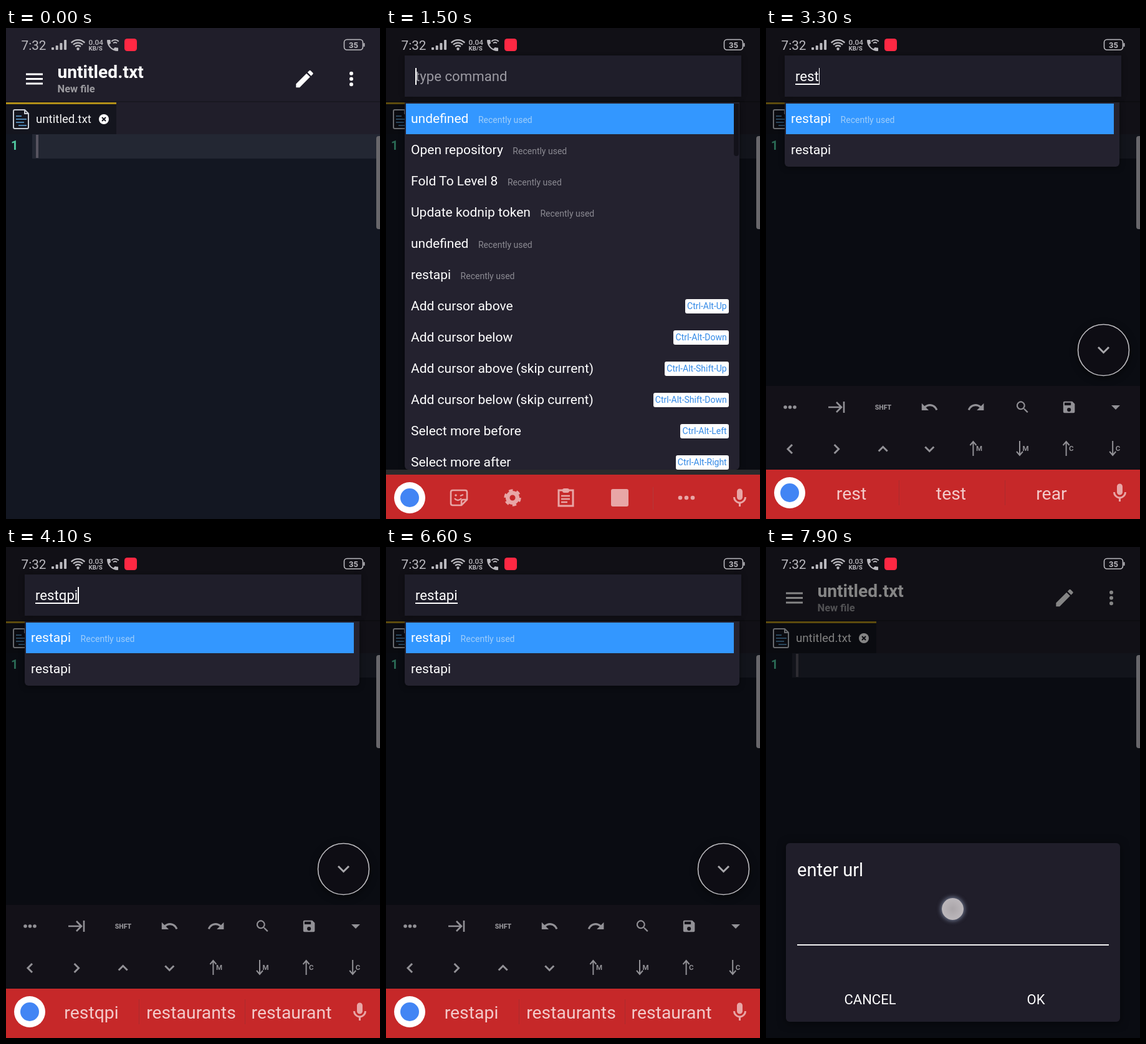
Recreate the animation shown at these times as an HTML page. Size 600 by 786 pixels, loop 8000 ms.

```html
<!DOCTYPE html>
<html lang="en">
<head>
<meta charset="utf-8">
<title>Command palette</title>
<style>
html, body { margin: 0; width: 100%; height: 100%; overflow: hidden; background: #131722; }
#stage { position: relative; width: 600px; height: 786px; overflow: hidden; font-family: Roboto, sans-serif; color: #fff; }
#stage > * { position: absolute; }
svg { left: 0; top: 0; width: 600px; height: 786px; font-family: Roboto, sans-serif; }
#dim { inset: 0; background: rgba(0, 0, 0, .48); }
#palette { inset: 0; }
#palette > * { position: absolute; }
#input { left: 30px; top: 44px; width: 523px; height: 66px; padding-left: 17px; background: #1f1e2a; font-size: 22.2px; line-height: 66px; box-shadow: 0 0 8px rgba(0, 0, 0, .35); }
#hint { color: #9b9aa2; position: absolute; }
#typed { display: inline-block; position: relative; }
#typed::after { content: ""; position: absolute; left: 0; right: 0; top: 45px; height: 1.5px; background: #fff; }
#caret { display: inline-block; position: absolute; top: 20px; width: 1.6px; height: 27px; background: #fff; }
#list { left: 30px; top: 119px; width: 537px; overflow: hidden; background: #24222f; border-radius: 0 0 6px 6px; font-size: 21px; box-shadow: 0 2px 10px rgba(0, 0, 0, .4); }
.row { position: relative; top: 1px; height: 50px; margin: 0 9px 0 2px; padding-left: 8px; line-height: 50px; white-space: pre; }
.row:first-child { background: linear-gradient(transparent 1px, #3397ff 1px); }
.row small { margin-left: 15.5px; font-size: 14px; color: #8b8a92; }
.row:first-child small { color: #9fcdf9; }
kbd { position: absolute; right: 8px; top: 14px; height: 23px; padding: 0 3.3px; border-radius: 3px; background: #fff; color: #3289e6; font: 14px/23px Roboto, sans-serif; }
#thumb { left: 558px; top: 121px; width: 8px; background: #13121a; border-radius: 0 0 4px 4px; }
#dialog { left: 32px; width: 536px; height: 286px; border-radius: 6px; background: #201e2a; box-shadow: 0 2px 14px rgba(0, 0, 0, .5); }
#dialog * { position: absolute; line-height: 40px; white-space: pre; }
#dialog .title { left: 18px; top: 23px; font-size: 29px; }
#dialog .line { left: 18px; top: 162px; width: 500px; height: 2px; background: #f2f2f2; }
#dialog .button { top: 231px; width: 200px; text-align: center; font-size: 22px; }
#dot { left: 282px; top: 562px; width: 35px; height: 35px; border-radius: 50%; background: radial-gradient(#aaa5a9, #c3bfc3); box-shadow: 0 0 6px 2px rgba(150, 165, 195, .6); }
</style>
</head>
<body>
<div id="stage">
  <svg id="editor"></svg>
  <div id="dim"></div>
  <svg id="tools"></svg>
  <div id="palette">
    <div id="input"><span id="hint">type command</span><span id="typed"></span><i id="caret"></i></div>
    <div id="list"></div>
    <div id="thumb"></div>
  </div>
  <div id="dialog">
    <div class="title">enter url</div>
    <div class="line"></div>
    <div class="button" style="left:35px">CANCEL</div>
    <div class="button" style="left:301px">OK</div>
  </div>
  <svg id="keyboard"></svg>
  <svg id="status"></svg>
  <div id="dot"></div>
</div>
<script>
const $ = id => document.getElementById(id);
const DURATION = 8000;

// ---- drawing helpers ----
const rect = (x, y, w, h, fill, r = 0) => `<rect x="${x}" y="${y}" width="${w}" height="${h}" rx="${r}" fill="${fill}"/>`;
const circle = (x, y, r, fill, more = '') => `<circle cx="${x}" cy="${y}" r="${r}" fill="${fill}" ${more}/>`;
const line = (d, color, width = 2, more = '') => `<path d="${d}" fill="none" stroke="${color}" stroke-width="${width}" ${more}/>`;
const label = (s, x, y, size, fill, weight = 400, more = '') =>
  `<text x="${x}" y="${y}" font-size="${size}" font-weight="${weight}" fill="${fill}" ${more}>${s}</text>`;
const icon = (d, x, y, scale, fill) =>
  `<path transform="translate(${x} ${y}) scale(${scale}) translate(-12 -12)" d="${d}" fill="${fill}"/>`;
const dots = (x, y, dx, dy, r, fill) => [-1, 0, 1].map(k => circle(x + k * dx, y + k * dy, r, fill)).join('');

const PENCIL = 'M3 17.25V21h3.75L17.81 9.94l-3.75-3.75zM20.71 7.04a1 1 0 0 0 0-1.41l-2.34-2.34a1 1 0 0 0-1.41 0l-1.83 1.83 3.75 3.75z';
const SEARCH = 'M15.5 14h-.79l-.28-.27A6.5 6.5 0 1 0 9.5 16c1.61 0 3.09-.59 4.23-1.57l.27.28v.79l5 4.99L20.49 19zm-6 0a4.5 4.5 0 1 1 0-9 4.5 4.5 0 0 1 0 9z';
const SAVE = 'M17 3H5a2 2 0 0 0-2 2v14a2 2 0 0 0 2 2h14a2 2 0 0 0 2-2V7zm-5 16a3 3 0 1 1 0-6 3 3 0 0 1 0 6zm3-10H5V5h10z';
const UNDO = 'M12.5 8c-2.65 0-5.05 1-6.9 2.6L2 7v9h9l-3.62-3.62A8 8 0 0 1 12.5 10.5c3.54 0 6.55 2.31 7.6 5.5l2.37-.78C21.08 11.03 17.15 8 12.5 8z';
const MIC = 'M12 14a3 3 0 0 0 3-3V5a3 3 0 0 0-6 0v6a3 3 0 0 0 3 3zm5-3a5 5 0 0 1-10 0H5a7 7 0 0 0 6 6.92V21h2v-3.08A7 7 0 0 0 19 11z';
const PHONE = 'M6.6 10.8a15 15 0 0 0 6.6 6.6l2.2-2.2a1 1 0 0 1 1-.25 11 11 0 0 0 3.6.57 1 1 0 0 1 1 1V20a1 1 0 0 1-1 1A17 17 0 0 1 3 4a1 1 0 0 1 1-1h3.5a1 1 0 0 1 1 1c0 1.25.2 2.45.57 3.57a1 1 0 0 1-.25 1z';

function drawEditor() {
  const white = '#fff', header = '#201e2a';
  $('editor').innerHTML =
    rect(0, 0, 600, 786, '#131722') + rect(0, 0, 600, 170, header) +
    rect(0, 117, 600, 2, '#191821') +
    [72.5, 80, 87.5].map(y => rect(32, y, 27, 3, white)).join('') +
    label('untitled.txt', 82.5, 80, 28.2, white, 700) +
    label('New file', 82.5, 103, 16.5, '#9b9a9f', 700) +
    icon(PENCIL, 479, 81.5, 1.52, white) + dots(554, 81.5, 0, 8.7, 3, white) +
    rect(0, 119, 177, 51, '#14151e') + rect(0, 119, 177, 3, '#b18f18') +
    line('M30 131H14q-2 0-2 2v26q0 2 2 2h20q2 0 2-2v-22zv6h6', '#c9cdd4', 2) +
    line('M16 141h9M16 146h17M16 151h13M20 156h13', '#4f83ad', 2) +
    label('untitled.txt', 48, 152, 18.7, '#f4f4f4') +
    circle(157, 146, 8, white) + line('M154 143l6 6m0-6l-6 6', '#14151e', 2) +
    rect(42, 170, 558, 39, '#232733') + rect(48, 171, 4, 37, '#575460') +
    label('1', 8, 195, 20, '#50c9a0', 700);
}

function drawTools() {
  const grey = '#929196';
  const column = k => 38.5 + k * 74.6;
  const chevron = (k, angle) =>
    `<g transform="translate(${column(k)} 674) rotate(${angle})">${line('M-7 3.5L0-3.5L7 3.5', grey, 3)}</g>`;
  const move = (k, letter, flip) =>
    `<g transform="translate(${column(k) - 4.5} 673) scale(1 ${flip})">${line('M0 12V-11M-5-5L0-11L5-5', grey, 2)}</g>` +
    label(letter, column(k), 677, 11.5, grey, 700);
  $('tools').innerHTML =
    circle(541.5, 515.5, 41, '#0e0d14', 'stroke="#bdbcc0" stroke-width="1.6" style="filter:drop-shadow(0 3px 6px #0008)"') +
    line('M533 511l8.5 8.5L550 511', '#a9a8ac', 3) +
    rect(0, 573, 600, 134, '#131118') +
    dots(column(0), 607, 7.5, 0, 2.8, grey) +
    line('M100 607h20M113 599l8 8l-8 8M125 598v18', grey, 2.6) +
    label('SHFT', 188, 611, 10.5, grey, 900, 'text-anchor="middle"') +
    icon(UNDO, column(3), 607, 1.25, grey) +
    `<g transform="translate(${2 * column(4)} 0) scale(-1 1)">${icon(UNDO, column(4), 607, 1.25, grey)}</g>` +
    icon(SEARCH, column(5), 607, 1.07, grey) + icon(SAVE, column(6), 607, 1.03, grey) +
    `<path d="M554 604h14l-7 7z" fill="${grey}"/>` +
    chevron(0, -90) + chevron(1, 90) + chevron(2, 0) + chevron(3, 180) +
    move(4, 'M', 1) + move(5, 'M', -1) + move(6, 'C', 1) + move(7, 'C', -1);
}

function drawKeyboard() {
  const pink = '#e8a6a6';
  const shortcuts =
    line('M107 732h20q3 0 3 3v12l-9 9h-14q-3 0-3-3v-18q0-3 3-3zM130 747h-6q-3 0-3 3v6', pink, 2.6) +
    circle(112, 740, 1.8, pink) + line('M119 741l5-2M110 745q5 6 11 0', pink, 2.4) +
    circle(203, 744, 7.8, 'none', `stroke="${pink}" stroke-width="6.5"`) +
    circle(203, 744, 11.7, 'none', `stroke="${pink}" stroke-width="4" stroke-dasharray="6.2 6.05"`) +
    line('M277 732h23v25h-23z', pink, 3) + rect(283, 729, 11, 7, pink, 3) +
    line('M281 741h14M281 746h14M281 751h10', pink, 2.4) +
    rect(361, 730, 28, 28, pink, 3) + rect(428, 727, 1, 36, '#b23a3a') +
    dots(482, 744, 10, 0, 3.3, pink);
  const word = x => label('', x, 755, 28.4, '#f3caca', 400, 'class="word" text-anchor="middle"');
  $('keyboard').innerHTML = rect(0, 707, 600, 79, '#2b2a2c') +
    `<g id="keys">${rect(0, 707, 600, 90, '#c62829')}
      ${circle(38, 744, 25, '#fff')}${circle(38, 744, 15, '#4285f4')}
      ${icon(MIC, 567.5, 744.5, 1.5, pink)}
      <g id="shortcuts">${shortcuts}</g>
      <g id="words">${[137, 297, 458].map(word).join('')}
        ${rect(213, 724, 1, 40, '#aa2c2e')}${rect(383, 724, 1, 40, '#aa2c2e')}</g></g>`;
}

function drawStatus() {
  const grey = '#bbbabf';
  const arc = (x, y, r, w) => line(`M${x - r * .72} ${y - r * .69}A${r} ${r} 0 0 1 ${x + r * .72} ${y - r * .69}`, grey, w);
  $('status').innerHTML =
    label('7:32', 24.5, 35, 20.7, grey) +
    [4, 7, 11, 16].map((h, k) => rect(73 + k * 6.7, 35 - h, 4, h, grey, 1)).join('') +
    [15, 10.5, 6].map(r => arc(115.5, 34, r, 2.3)).join('') + circle(115.5, 33.5, 2.2, grey) +
    label('', 132.5, 26.5, 11.8, grey, 500, 'id="speed"') + label('KB/S', 132.5, 36, 9.8, grey, 700) +
    icon(PHONE, 171, 28, 1, grey) + arc(175, 27, 8, 2) + arc(175, 27, 4, 2) +
    rect(190, 17, 20, 20, '#ff2843', 4.5) +
    `<rect x="542.5" y="18.5" width="30" height="16.5" rx="4.5" fill="none" stroke="${grey}" stroke-width="1.6"/>` +
    rect(573.5, 24, 2, 6, grey, 1) +
    label('35', 557.5, 31.5, 13, grey, 700, 'text-anchor="middle"') +
    rect(594, 173, 10, 149, '#68676b', 4);
}

// ---- palette contents ----
const recent = ['undefined', 'Open repository', 'Fold To Level 8', 'Update kodnip token', 'undefined', 'restapi']
  .map(name => [name, 'Recently used']);
const skipping = [
  ['Add cursor above (skip current)', '', 'Ctrl-Alt-Shift-Up'],
  ['Add cursor below (skip current)', '', 'Ctrl-Alt-Shift-Down'],
  ['Select more before', '', 'Ctrl-Alt-Left'],
  ['Select more after', '', 'Ctrl-Alt-Right'],
];
const lists = {
  all: [...recent, ['Add cursor above', '', 'Ctrl-Alt-Up'], ['Add cursor below', '', 'Ctrl-Alt-Down'], ...skipping],
  some: [...recent, ...skipping],
  found: [recent[5], ['restapi']],
};
const row = ([name, note, keys]) =>
  `<div class="row">${name}${note ? `<small>${note}</small>` : ''}${keys ? `<kbd>${keys}</kbd>` : ''}</div>`;

// ---- timeline: each step overrides part of the state ----
const start = { palette: false, dim: false, list: 'all', bottom: 786, thumb: 205, text: '', words: '',
  keys: null, tools: false, dialog: null, dot: false, speed: '0.04' };
const steps = [
  [1300, { palette: true, dim: true }],
  [1400, { keys: 45, bottom: 707 }],
  [1500, { keys: 8, text: '' }],
  [1600, { keys: 0 }],
  [1700, { tools: true, bottom: 586, thumb: 186 }],
  [2200, { text: 'r' }],
  [2300, { words: 'r are right', list: 'some', thumb: 233 }],
  [2500, { text: 're' }],
  [2600, { words: 're return regards' }],
  [2800, { text: 'res', list: 'found', bottom: 222, thumb: 121 }],
  [2900, { words: 'res rest red' }],
  [3200, { text: 'rest' }],
  [3300, { words: 'rest test rear' }],
  [3500, { text: 'restq' }],
  [3600, { words: 'restq rest resta', speed: '0.03' }],
  [3700, { text: 'restqp' }],
  [3800, { words: 'restqp rest restaurant' }],
  [4000, { text: 'restqpi' }],
  [4100, { words: 'restqpi restaurants restaurant' }],
  [4800, { text: 'restqp' }],
  [4900, { text: 'restq' }],
  [5000, { text: 'rest', words: 'rest test rear' }],
  [5200, { text: 'resta' }],
  [5300, { text: 'restap', words: 'resta restaurants restaurant' }],
  [5400, { words: 'restap restaurants restaurant' }],
  [6100, { text: 'restapi' }],
  [6200, { words: 'restapi restaurants restaurant' }],
  [7000, { palette: false, dialog: 232, keys: 8 }],
  [7100, { keys: 80 }],
  [7200, { dialog: 474, keys: null, tools: false }],
  [7800, { dot: true }],
];

function stateAt(time) {
  const state = { ...start, typedAt: 0 };
  for (const [at, change] of steps) {
    if (at > time) break;
    Object.assign(state, change);
    if ('text' in change) state.typedAt = at;
  }
  return state;
}

const show = (id, on) => { $(id).style.display = on ? '' : 'none'; };
let shownList;

function render(time) {
  const s = stateAt(time);
  show('dim', s.dim);
  show('tools', s.tools);
  show('palette', s.palette);
  show('dialog', s.dialog !== null);
  show('keyboard', s.keys !== null);
  show('dot', s.dot);
  $('speed').textContent = s.speed;
  $('dialog').style.top = s.dialog + 'px';

  $('keys').setAttribute('transform', `translate(0 ${s.keys || 0})`);
  show('shortcuts', !s.words);
  show('words', s.words);
  const words = s.words.split(' ');
  document.querySelectorAll('.word').forEach((el, k) => { el.textContent = words[k] || ''; });

  show('hint', !s.text);
  $('typed').textContent = s.text;
  show('typed', s.text);
  show('caret', Math.floor((time - s.typedAt) / 500) % 2 === 0);
  $('list').style.height = s.bottom - 119 + 'px';
  $('thumb').style.height = s.thumb - 121 + 'px';
  if (shownList !== s.list) $('list').innerHTML = lists[shownList = s.list].map(row).join('');
}

drawEditor();
drawTools();
drawKeyboard();
drawStatus();
const began = performance.now();
function tick() {
  render((performance.now() - began) % DURATION);
  requestAnimationFrame(tick);
}
tick();
</script>
</body>
</html>
```
